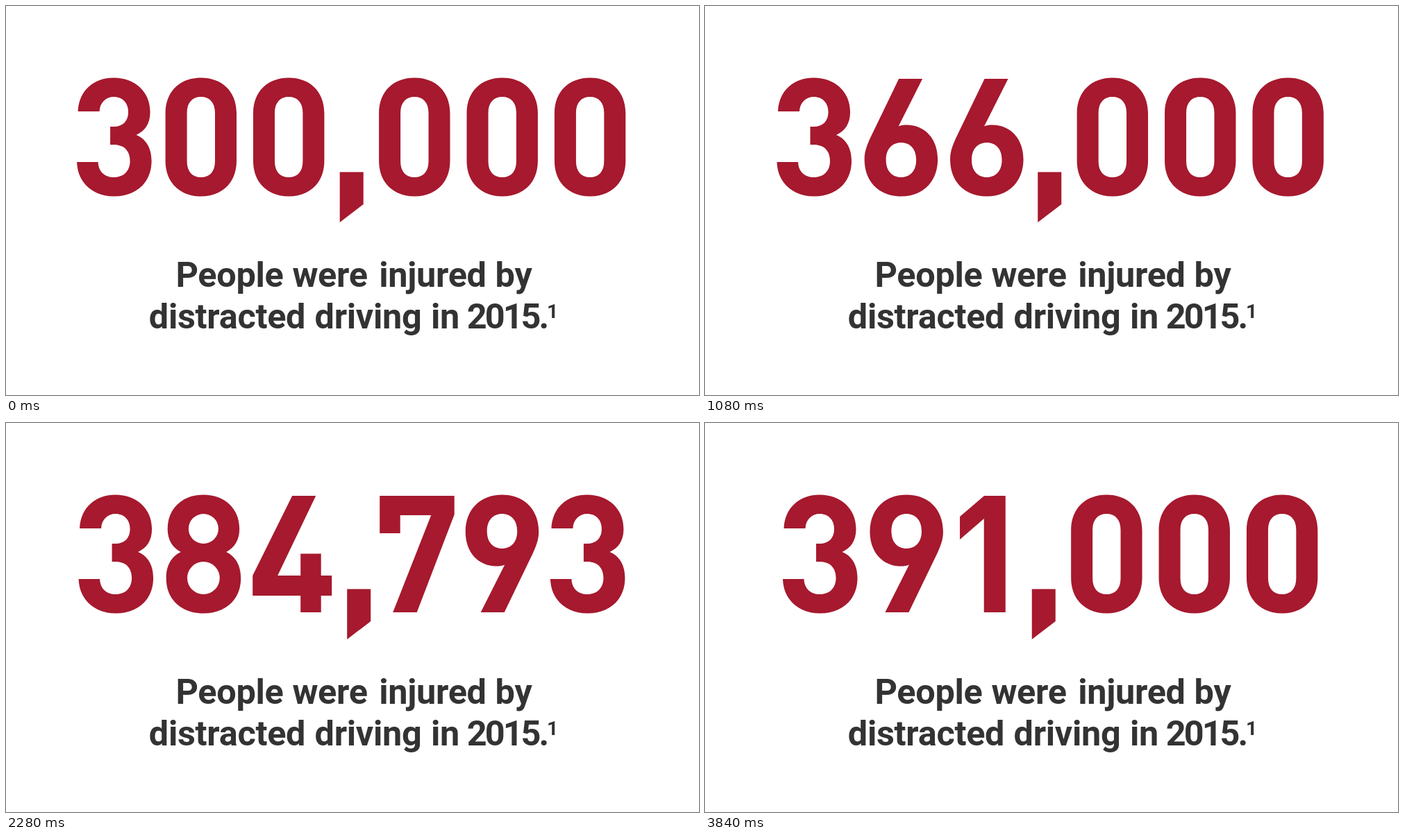
These frames come from a looping animation (998x561 px, 5.76 s). An HTML page:

```html
<!DOCTYPE html>
<html lang="en">
<head>
<meta charset="utf-8">
<title>Injury counter</title>
<style>
  html, body { margin: 0; width: 100%; height: 100%; overflow: hidden; background: #fff; }
  svg { display: block; width: 100vw; height: 100vh; }
  #count { fill: #a6192e; }
  text {
    fill: #333;
    font: 700 50.4px Roboto, "Open Sans", sans-serif;
    letter-spacing: -.3px;
    text-anchor: middle;
  }
  .year { letter-spacing: -3px; }
  .note { font-size: 28.5px; }
</style>
</head>
<body>
<svg viewBox="0 0 998 561">
  <g id="count" role="img"></g>
  <text x="322" y="405">People</text>
  <text x="466.5" y="405">were</text>
  <text x="614.5" y="405">injured</text>
  <text x="731" y="405">by</text>
  <text x="318.5" y="465">distracted</text>
  <text x="521.5" y="465">driving</text>
  <text x="632.5" y="465">in</text>
  <text class="year" x="721.5" y="465">2015.</text>
  <text class="note" x="787" y="449.5">1</text>
</svg>
<script>
const LOOP = 5760, STEP = 40, STEPS = 96;
const FROM = 300000, TO = 391000, CENTRE = 498;

const NINE = 'M22 273L56.5 204.5C53 206 49 206.5 45 206.5C18 206.5 0 186 0 157C0 124 22 103.5 52.7 103.5' +
  'C84 103.5 105.5 124 105.5 157C105.5 168 102 177 97 188L56 273Z' +
  'M31 156C31 140 40 131 52.7 131S74.5 140 74.5 156S65.5 181 52.7 181S31 172 31 156Z';

// [ink width, left bearing, right bearing, outline]
const GLYPHS = {
  0: [102.4, 12, 12, 'M0 155C0 122 22 103.5 51.2 103.5S102.4 122 102.4 155V223C102.4 256 80.4 274.5 51.2 274.5S0 256 0 223Z' +
    'M31 154C31 139 39 131 51.2 131S71.4 139 71.4 154V224C71.4 239 63.4 247 51.2 247S31 239 31 224Z'],
  1: [65.7, 16.3, 23.7, 'M0 135L35 105H65.7V273H34.7V138L0 168Z'],
  2: [103, 8.5, 8.5, 'M1 157C1 124 23 103.5 52 103.5C83 103.5 103 124 103 154C103 172 97 182 84 197L42 245H103V273H0V245' +
    'L60 176C68 167 72 161 72 153.5C72 140 64 131 52 131C40 131 31.5 139 31.5 157Z'],
  3: [107.5, 8.9, 9.4, 'M1.5 152C3 121 25 103.5 53 103.5C83 103.5 105.5 123 105.5 153C105.5 170 98 180 85.5 186' +
    'C98 191 107.5 203 107.5 223.5C107.5 256 84 274.5 53.5 274.5C24 274.5 1 256 0 225H30.5' +
    'C31 239 40 247 53.5 247C67 247 76.5 238 76.5 223.5C76.5 209 68 200 53 200H48V174H53' +
    'C66 174 74 166 74 153C74 140 66 131 53 131C42 131 33 139 32.5 152Z'],
  4: [114, 7.8, 9, 'M0 220L57 105H91L36 220H69V188.5H98.5V220H114V249H98.5V273H69V249H0Z'],
  5: [103, 11, 9.2, 'M3.5 105H99V133H31.5V168.5C38 163.5 46 160 58 160C88 160 103 180 103 217C103 256 84 274.5 52 274.5' +
    'C24 274.5 2 256 0 226H30.5C32 239 39 247 52 247C66 247 72.5 237 72.5 217C72.5 195 66 186 52 186' +
    'C42 186 35 191 31.5 200H3.5Z'],
  6: [105.5, 9.2, 8.7, NINE],
  7: [107.5, 8.4, 7.5, 'M0 105H107.5V132L53.5 273H19L74 133H29.5V159H0Z'],
  8: [107.5, 9.2, 9.2, 'M53.7 103.5C84 103.5 105.5 123 105.5 153C105.5 169 98 180 86.5 186C99 192 107.5 204 107.5 224' +
    'C107.5 256 84 274.5 53.7 274.5S0 256 0 224C0 204 8.5 192 21 186C9.5 180 2 169 2 153C2 123 23.4 103.5 53.7 103.5Z' +
    'M32.2 152.5a21.5 21.5 0 1 0 43 0a21.5 21.5 0 1 0 -43 0Z' +
    'M30.3 223.5a23.4 23.5 0 1 0 46.8 0a23.4 23.5 0 1 0 -46.8 0Z'],
  9: [105.5, 8.5, 7.8, NINE],
  ',': [34, 12, 12, 'M0 239.5H34V286L0 312Z']
};
const KERN = { '0,': -1.7, ',0': -1.6, ',7': -7.4, '7,': -15, '1,': 2.3, '4,': 1, ',3': .6, '30': -1.4, '73': -1.9, '09': -1 };
const NUDGE = { 0: -.8, 4: 1.6 };

// Ease with a very steep start: x = s^3 + 3e-4 s(1-s)^2, y = 3s^2 - 2s^3
function ease(x) {
  let lo = 0, hi = 1;
  for (let i = 0; i < 50; i++) {
    const s = (lo + hi) / 2;
    if (s ** 3 + 3e-4 * s * (1 - s) ** 2 < x) lo = s; else hi = s;
  }
  return 3 * lo ** 2 - 2 * lo ** 3;
}

function valueAt(n) {
  if (n <= 0) return FROM;
  if (n >= STEPS) return TO;
  return Math.round(FROM + (TO - FROM) * ease(n / STEPS));
}

const count = document.getElementById('count');

function draw(value) {
  const chars = [...String(value).replace(/(\d{3})$/, ',$1')];
  let end = 0;
  const xs = chars.map((c, i) => {
    const [width, left] = GLYPHS[c];
    const prev = chars[i - 1];
    const x = i ? end + GLYPHS[prev][2] + left + (KERN[prev + c] || 0) : 0;
    end = x + width;
    return x;
  });
  const start = CENTRE - end / 2 + (NUDGE[chars[chars.length - 1]] || 0);
  count.setAttribute('aria-label', chars.join(''));
  count.innerHTML = chars.map((c, i) => {
    const turn = c === '6' ? ' rotate(180 52.75 189)' : '';
    return `<path fill-rule="evenodd" transform="translate(${(start + xs[i]).toFixed(2)} 0)${turn}" d="${GLYPHS[c][3]}"/>`;
  }).join('');
}

const began = performance.now();
let shown = -1;

function tick() {
  const t = (performance.now() - began) % LOOP;
  const n = Math.min(STEPS, Math.floor(t / STEP));
  if (n !== shown) draw(valueAt(shown = n));
  requestAnimationFrame(tick);
}
tick();
</script>
</body>
</html>
```
